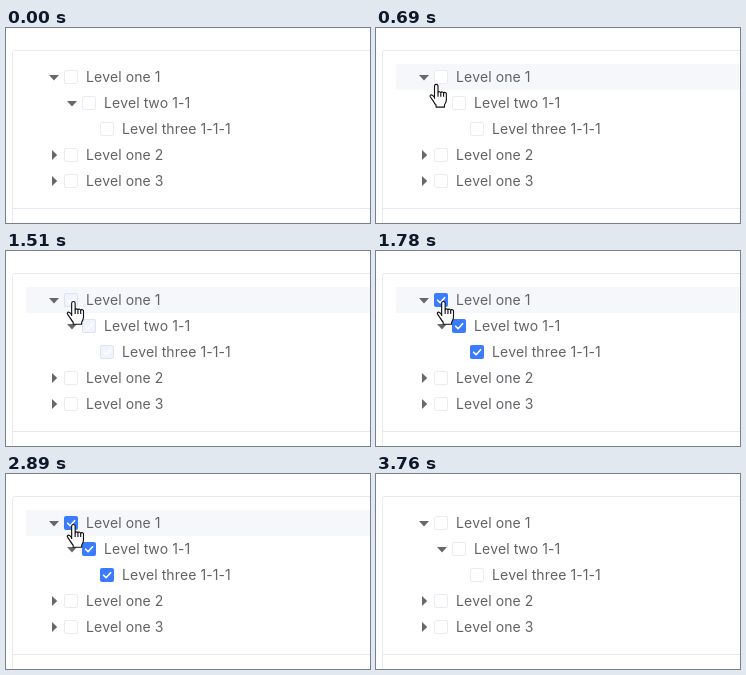
Write an HTML page that moves like this. It is 364 px wide and 195 px high and loops after 4.58 s.

```html
<!DOCTYPE html>
<html lang="en">
<head>
<meta charset="utf-8">
<title>Tree checkbox</title>
<style>
  html, body { margin: 0; width: 100%; height: 100%; overflow: hidden; background: #fff; }
  svg { display: block; width: 364px; height: 195px; }
  text { font: 14px Inter, sans-serif; font-kerning: none; letter-spacing: .05px; fill: #616367; }
  .line { fill: none; stroke: #e9e9ec; }
  .caret { fill: #66686c; }
  .box { fill: #fff; stroke: #ebecf0; }
  .on rect { fill: #3b7cff; }
  .on path { fill: none; stroke: #fff; stroke-width: 1.6; stroke-linecap: round; stroke-linejoin: round; }
  #cursor path { fill: #fff; stroke: #111; stroke-width: 1.1; stroke-linejoin: round; }
  #cursor .fold { fill: none; }
</style>
</head>
<body>
<svg viewBox="0 0 364 195">
  <path class="line" d="M370 22.5H8.5a2 2 0 0 0-2 2V200M6.5 180.5H370"/>
  <rect id="hover" x="20" width="350" height="26" fill="#f5f7fa"/>
  <g id="tree"></g>
  <g id="cursor">
    <g id="hand">
      <path d="M5 15V2.6a1.7 1.7 0 0 1 3.4 0V9a1.4 1.4 0 0 1 2.7.2a1.4 1.4 0 0 1 2.7.6a1.3 1.3 0 0 1 2.7.9V16q0 2.5-1.8 5v2H6.5v-2Q5 19.5 4 17.5L1 13.2Q.2 11.6 1.8 11.2Q3 11 5 13.6"/>
      <path class="fold" d="M8.4 9v4M11.1 9.5v3.5M13.8 10v3"/>
    </g>
    <path id="arrow" d="M6.7.5v15.5l3.6-3.4 2.6 5.6 2-1-2.5-5.5h5z"/>
  </g>
</svg>
<script>
const LOOP = 4580, START = 130, TICK = 68.6, ROW = 26, TOP = 36;
const $ = id => document.getElementById(id);

const rows = [
  ['Level one 1', 0, 'open'],
  ['Level two 1-1', 1, 'open'],
  ['Level three 1-1-1', 2, ''],
  ['Level one 2', 0, 'shut'],
  ['Level one 3', 0, 'shut']
];
const carets = { open: 'M43 47H53L48 52.6z', shut: 'M46 44L51.2 49L46 54z' };

$('tree').innerHTML = rows.map(([label, depth, state], i) => `
  <g transform="translate(${depth * 18} ${i * ROW})">
    ${state && `<path class="caret" d="${carets[state]}"/>`}
    <rect class="box" x="58.5" y="42.5" width="13" height="13" rx="1.5"/>
    ${i < 3 ? `<g class="on">
      <rect x="58" y="42" width="14" height="14" rx="2"/>
      <path d="M61.6 49.2l2.5 2.5 4.5-5"/>
    </g>` : ''}
    <text x="80" y="54">${label}</text>
  </g>`).join('');

const marks = document.querySelectorAll('.on');
const ramp = (t, from, to) => Math.min(1, Math.max(0, (t - from) / (to - from)));
const easeOut = (p, power) => 1 - (1 - p) ** power;

// Sweep in, settle on the first row, aim at its checkbox, leave.
function pointer(t) {
  const enter = ramp(t, START, 620), settle = ramp(t, 620, 890);
  const aim = ramp(t, 1020, 1365), leave = ramp(t, 3215, 3700);
  return [
    271 - 217 * easeOut(enter, 2) - 3 * settle + 9.5 * aim + 300 * leave,
    188 - 131 * easeOut(enter, 3) - 7.4 * settle + 150 * leave
  ];
}

// Check, uncheck to a faint tint, check again, clear.
function checked(t) {
  const dip = ramp(t, 2051, 2188) - ramp(t, 2531, 2874);
  return ramp(t, 1480, 1776) - .92 * dip - ramp(t, 3011, 3150);
}

function show(id, visible) {
  $(id).style.display = visible ? '' : 'none';
}

function draw(time) {
  const t = START + Math.floor((time - START) / TICK + .05) * TICK;
  const [x, y] = pointer(t);
  const row = Math.floor((y + 1 - TOP) / ROW);
  const inside = t >= START && row < rows.length;

  $('cursor').setAttribute('transform', `translate(${x} ${y}) scale(1.03)`);
  show('cursor', t >= START);
  show('hand', inside);
  show('arrow', !inside);
  show('hover', inside);
  $('hover').setAttribute('y', TOP + row * ROW);
  marks.forEach(mark => mark.style.opacity = checked(t));
}

const begin = performance.now();
function loop() {
  draw((performance.now() - begin) % LOOP);
  requestAnimationFrame(loop);
}
loop();
</script>
</body>
</html>
```
